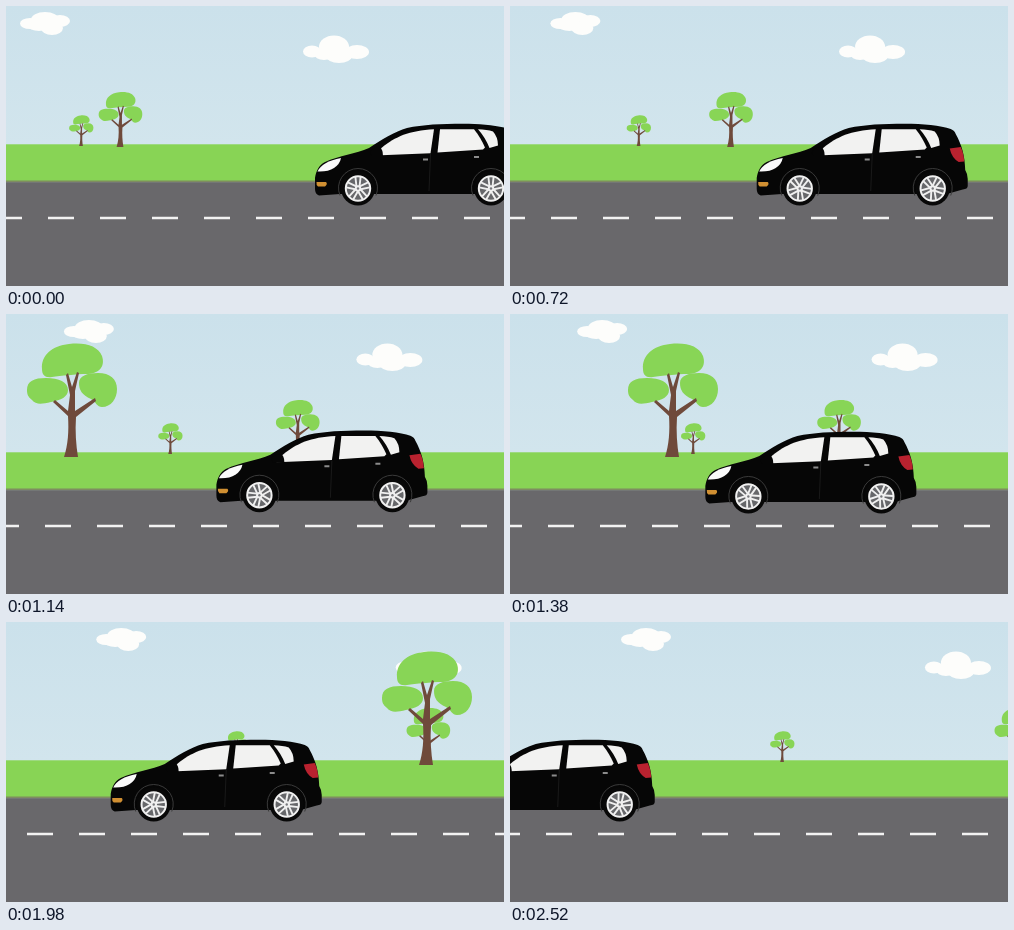
Animation of 498 by 280 pixels, one loop 2580 ms. Source, as an HTML page:

```html
<!DOCTYPE html>
<html lang="en">
<head>
<meta charset="utf-8">
<title>Country drive</title>
<style>
  html, body { margin: 0; width: 100%; height: 100%; overflow: hidden; background: #cfe3ec; }
  svg { display: block; width: 498px; height: 280px; }
</style>
</head>
<body>
<svg viewBox="0 0 498 280">
  <defs>
    <linearGradient id="sky" x2="0" y2="1">
      <stop offset="0" stop-color="#cbe1eb"/>
      <stop offset="1" stop-color="#d2e5ed"/>
    </linearGradient>
    <!-- Origin at the foot of the trunk -->
    <g id="tree">
      <g fill="#88d556">
        <path d="M-29-88C-30-102-19-111-2-113C14-115 27-111 31-101C34-92 30-84 17-83C4-83-10-81-19-80C-26-79-29-82-29-88Z"/>
        <path d="M-44-67C-44-76-37-79-25-79C-12-79-3-75-3-67C-3-60-10-57-20-55C-29-53-35-52-39-57C-43-60-44-63-44-67Z"/>
        <path d="M8-74C8-81 16-84 27-84C39-84 46-78 46-68C46-58 40-50 31-50C26-50 25-55 20-58C11-62 8-67 8-74Z"/>
      </g>
      <path fill="#6f4a3b" d="M-7 0C-3-12-2-26-3-41L-18-55L-16-57L-3-46L-1-62L-5-82L-3-84L1-70L6-85L8-84L4-66L4-46L24-59L25-56L5-40C4-26 5-12 7 0Z"/>
    </g>
    <g id="wheel">
      <path d="M-18 7A19.5 19.5 0 1 1 18 7" fill="none" stroke="#3a3a3a"/>
      <circle r="17" fill="#080808"/>
      <circle r="12.200" fill="#66676a" stroke="#f0f0f0" stroke-width="2"/>
      <g class="spokes" stroke="#f0f0f0" stroke-width="1.900"></g>
      <circle r="3.200" fill="#f0f0f0"/>
      <circle r="1.200" fill="#77787c"/>
    </g>
  </defs>

  <rect width="498" height="140" fill="url(#sky)"/>
  <g id="cloudA" fill="#fdfdfb">
    <ellipse cx="10" cy="17.5" rx="10" ry="5.5"/>
    <ellipse cx="25" cy="13.5" rx="14" ry="7.5"/>
    <ellipse cx="40" cy="15" rx="10" ry="6"/>
    <ellipse cx="32" cy="22" rx="11" ry="7"/>
    <ellipse cx="19" cy="20" rx="11" ry="5"/>
  </g>
  <g id="cloudB" fill="#fdfdfb">
    <ellipse cx="9" cy="45.5" rx="9" ry="6"/>
    <ellipse cx="31" cy="41" rx="15" ry="11.5"/>
    <ellipse cx="54" cy="46" rx="12" ry="7"/>
    <ellipse cx="21" cy="48" rx="10" ry="6"/>
    <ellipse cx="36" cy="50" rx="13" ry="7"/>
  </g>

  <rect y="138.300" width="498" height="37" fill="#88d455"/>
  <rect y="174.500" width="498" height="2" fill="#7f8d60"/>
  <rect y="176.200" width="498" height="104" fill="#69686b"/>
  <path id="dashes" d="M-52 212H550" stroke="#f2f2f2" stroke-width="2.400" stroke-dasharray="26 26"/>

  <g id="treeA"><use href="#tree" transform="translate(0 140) scale(.27)"/></g>
  <g id="treeB"><use href="#tree" transform="translate(0 141) scale(.485)"/></g>
  <g id="treeC"><use href="#tree" transform="translate(0 143)"/></g>

  <!-- Origin at the front bumper -->
  <g id="car">
    <path fill="#060606" d="M0 172C1 165 4 159 10 156C24 149.500 41 148 54 142C66 134 80 125.500 92 122C108 118.500 126 117.700 148 117.700C166 117.700 184 119.500 194 123Q198 124.500 199 128C205 139 208 149 208.500 164Q211 168 211 173V180Q211 183 206 183.500L190 188H25L4 189.500Q0 188 0 183Z"/>
    <g fill="#f2f2f1">
      <path d="M60 149.500L67 141.500C80 131 94 124.500 119 123.300L115.500 147.300Z"/>
      <path d="M125 123.200H159C164 129 167 135 170 141.500L168 143.500L122.500 146.500Z"/>
      <path d="M163 123.300Q172 123.500 178 125.500Q183 131 183 139.500L174.500 142Q170 131 163 123.300Z"/>
    </g>
    <path fill="#060606" d="M55 147Q57 141 64 141.500Q68 142 68 150H57Z"/>
    <path fill="#fafafa" d="M2.500 165.500Q7 155.500 26 152Q25 158 19 162Q13 166 2.500 165.500Z"/>
    <path fill="#d08f32" d="M1.500 176H11Q13 178 10 180.500H3Q1 179 1.500 176Z"/>
    <path fill="#b9222f" d="M193 142.500L204 141Q207 147 207.500 155.500L202 156Q195 152 193 142.500Z"/>
    <path stroke="#8b8b8b" stroke-width="2" d="M108 153.500H113M159 151H164"/>
    <path stroke="#191919" fill="none" d="M115.500 148L114 185"/>
    <use href="#wheel" x="43" y="182.500"/>
    <use href="#wheel" x="176" y="182.500"/>
  </g>
</svg>
<script>
const LOOP = 2580, STEP = 60, DASH = 52;
const $ = id => document.getElementById(id);
const spokes = document.querySelector('.spokes');

// Five paired spokes
for (let i = 0; i < 5; i++) {
  const pair = document.createElementNS('http://www.w3.org/2000/svg', 'path');
  pair.setAttribute('d', 'M-1.3 0L-2.6-11.5M1.3 0L2.6-11.5');
  pair.setAttribute('transform', `rotate(${i * 72})`);
  spokes.append(pair);
}

// Linear interpolation through [time, value] pairs
function track(keys, t) {
  let i = 1;
  while (i < keys.length - 1 && t > keys[i][0]) i++;
  const [t0, a] = keys[i - 1], [t1, b] = keys[i];
  return a + (b - a) * (t - t0) / (t1 - t0);
}

const clock = [[0, 0], [720, 685], [1140, 1140], [2580, 2580]];
const road = [[0, 0], [360, 286], [720, 571], [1140, 985], [1380, 1192], [1980, 1695], [2520, 2178]];
const bigTree = [[720, -130], [1140, 65], [1380, 162], [1980, 420], [2520, 652]];

// Steady cruise, then the car pulls away
function carX(t) {
  const cruise = Math.min(t, 1245), rush = t - cruise;
  return 309 - 0.0865 * cruise - 0.0246 * rush - 0.0001453 * rush * rush;
}

// Slight hop before pulling away
const carY = t => -1.3 * Math.exp(-(((t - 1140) / 130) ** 2));

const move = (id, x, y = 0) =>
  $(id).setAttribute('transform', `translate(${x.toFixed(2)} ${y.toFixed(2)})`);

function draw(now) {
  const t = Math.floor(now % LOOP / STEP) * STEP;
  const s = track(clock, t), dist = track(road, t);
  move('cloudA', 14 + 0.0385 * s);
  move('cloudB', 297 + 0.0468 * s);
  move('treeA', 75 + 0.0782 * s);
  move('treeB', 114 + 0.1555 * s);
  move('treeC', track(bigTree, t));
  move('dashes', (dist + 42) % DASH);
  move('car', carX(t), carY(t));
  spokes.setAttribute('transform', `rotate(${(-dist * 3.6 % 360).toFixed(1)})`);
}

const start = performance.now();
function tick() {
  draw(performance.now() - start);
  requestAnimationFrame(tick);
}
tick();
</script>
</body>
</html>
```
